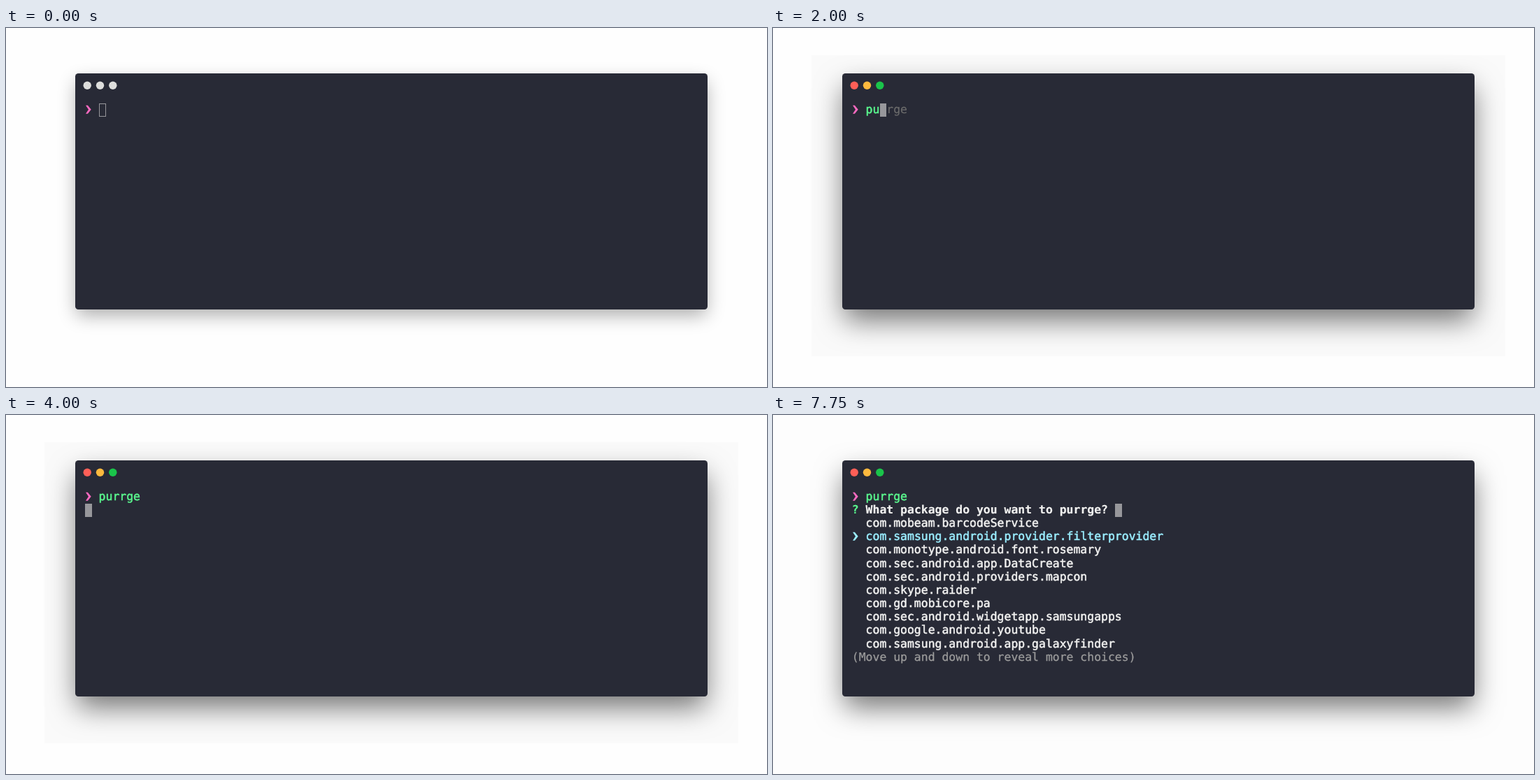
Recreate the animation shown at these times as an HTML page. Size 1088 px wide and 514 px high, loop 8 s.

```html
<!DOCTYPE html>
<html lang="en">
<head>
<meta charset="utf-8">
<title>Terminal</title>
<style>
  :root { --col: 9.907px; --row: 19.17px; }
  html, body { margin: 0; width: 100%; height: 100%; overflow: hidden; }
  body { position: relative; background: #fefefe; }
  body.late { background: #fdfdfd; }
  #backdrop { position: absolute; left: 55px; top: 39px; width: 992px; height: 431px; background: #fafafa; }
  body.idle #backdrop, body.late #backdrop { display: none; }

  #window {
    position: absolute; left: 99px; top: 65px; width: 904px; height: 338px;
    border-radius: 4.5px; background: #282a36;
    box-shadow: 0 18px 40px -3px rgba(0,0,0,.55);
  }
  .idle #window { box-shadow: 0 10px 27px -2px rgba(0,0,0,.33); }
  .idle circle { fill: #dededc; }

  #screen {
    position: absolute; left: 112.8px; top: 106.8px;
    font: 16.455px "DejaVu Sans Mono", monospace;
    text-rendering: geometricPrecision;
    color: #f1f1f0;
  }
  .line { height: var(--row); line-height: var(--row); white-space: pre; -webkit-text-stroke: .55px; }
  .green { color: #5af78e; }
  .red { color: #ff5c57; }
  .pink { color: #ff6ac1; }
  .cyan { color: #9aedfe; }
  .ghost { color: #6c6c6c; -webkit-text-stroke: .2px; }
  .dim { color: #9c9c9c; -webkit-text-stroke: .25px; }
  b { -webkit-text-stroke: .2px; }
  .chevron { display: inline-block; width: var(--col); height: 18px; vertical-align: top; overflow: visible; }

  #cursor {
    position: absolute; box-sizing: border-box;
    width: var(--col); height: 19px; background: #97979b;
  }
  .idle #cursor { background: none; border: 1px solid #97979b; }
  #pointer { position: absolute; left: 0; top: 0; overflow: visible; }
</style>
</head>
<body class="idle">
<div id="backdrop"></div>
<div id="window">
  <svg width="80" height="34">
    <circle cx="17.2" cy="17.2" r="5.7" fill="#ff5f57"/>
    <circle cx="35.5" cy="17.2" r="5.7" fill="#fdb93e"/>
    <circle cx="53.8" cy="17.2" r="5.7" fill="#1ac44a"/>
  </svg>
</div>
<div id="screen"></div>
<div id="cursor"></div>
<svg id="pointer" width="12" height="17">
  <path d="M.7 1V14.2L3.8 11.4 6.2 16.3 8.3 15.3 6.1 10.6H10.6Z" fill="#000" stroke="#fff" stroke-width="1.1" stroke-linejoin="round"/>
</svg>
<script>
const LOOP = 8000;
const COMMAND = "purrge";
const PACKAGES = [
  "com.mobeam.barcodeService",
  "com.samsung.android.provider.filterprovider",
  "com.monotype.android.font.rosemary",
  "com.sec.android.app.DataCreate",
  "com.sec.android.providers.mapcon",
  "com.skype.raider",
  "com.gd.mobicore.pa",
  "com.sec.android.widgetapp.samsungapps",
  "com.google.android.youtube",
  "com.samsung.android.app.galaxyfinder"
];

const get = id => document.getElementById(id);
const span = (cls, text) => `<span class="${cls}">${text}</span>`;
const chevron = cls =>
  `<svg class="chevron ${cls}" viewBox="0 0 9.907 18"><path fill="currentColor" d="M1 3.8H3.9L8.7 9.8 3.9 15.8H1L5 9.8Z"/></svg>`;

// Prompt line with the typed part and the suggested rest
function prompt(typed) {
  const known = typed < 3 || typed === COMMAND.length;
  const text = COMMAND.slice(0, typed);
  const entry = known ? span("green", text) : `<b class="red">${text}</b>`;
  const rest = typed ? " " + COMMAND.slice(typed + 1) : "";
  return chevron("pink") + " " + entry + span("ghost", rest);
}

function menu(selected, hint) {
  const question = '<b class="green">?</b> <b>What package do you want to purrge?</b> ';
  const items = PACKAGES.map((name, i) =>
    i === selected ? chevron("cyan") + " " + span("cyan", name) : "  " + name);
  return [question + span("dim", hint), ...items,
    span("dim", "(Move up and down to reveal more choices)")];
}

const typing = n => ({ lines: [prompt(n)], cursor: [2 + n, 0] });
const HINT = "(Use arrow keys or type to search)";
const listed = { lines: [prompt(6), ...menu(0, HINT)], cursor: [72, 1] };

const STEPS = [
  { at: 0, mode: "idle", ...typing(0) },
  { at: 250, mode: "idle", pointer: [958, 59], ...typing(0) },
  { at: 500, mode: "idle", pointer: [794, 180], ...typing(0) },
  { at: 750, pointer: [882, 138], ...typing(0) },
  { at: 1000, ...typing(0) },
  { at: 1750, ...typing(1) },
  { at: 2000, ...typing(2) },
  { at: 2250, ...typing(3) },
  { at: 3250, ...typing(4) },
  { at: 3500, ...typing(5) },
  { at: 3750, ...typing(6) },
  { at: 4000, lines: [prompt(6)], cursor: [0, 1] },
  { at: 6500, ...listed },
  { at: 7500, mode: "late", ...listed },
  { at: 7750, mode: "late", lines: [prompt(6), ...menu(1, "")], cursor: [38, 1] }
];

let shown;
function show(step) {
  if (step === shown) return;
  shown = step;
  document.body.className = step.mode || "";
  get("screen").innerHTML = step.lines.map(l => `<div class="line">${l}</div>`).join("");
  const [col, row] = step.cursor;
  get("cursor").style.left = 112.9 + col * 9.907 + "px";
  get("cursor").style.top = 108 + row * 19.17 + "px";
  const pointer = get("pointer").style;
  pointer.display = step.pointer ? "block" : "none";
  if (step.pointer) pointer.transform = `translate(${step.pointer[0]}px, ${step.pointer[1]}px)`;
}

const start = performance.now();
function tick() {
  const t = (performance.now() - start) % LOOP;
  show(STEPS.filter(s => s.at <= t).pop());
  requestAnimationFrame(tick);
}
tick();
</script>
</body>
</html>
```
